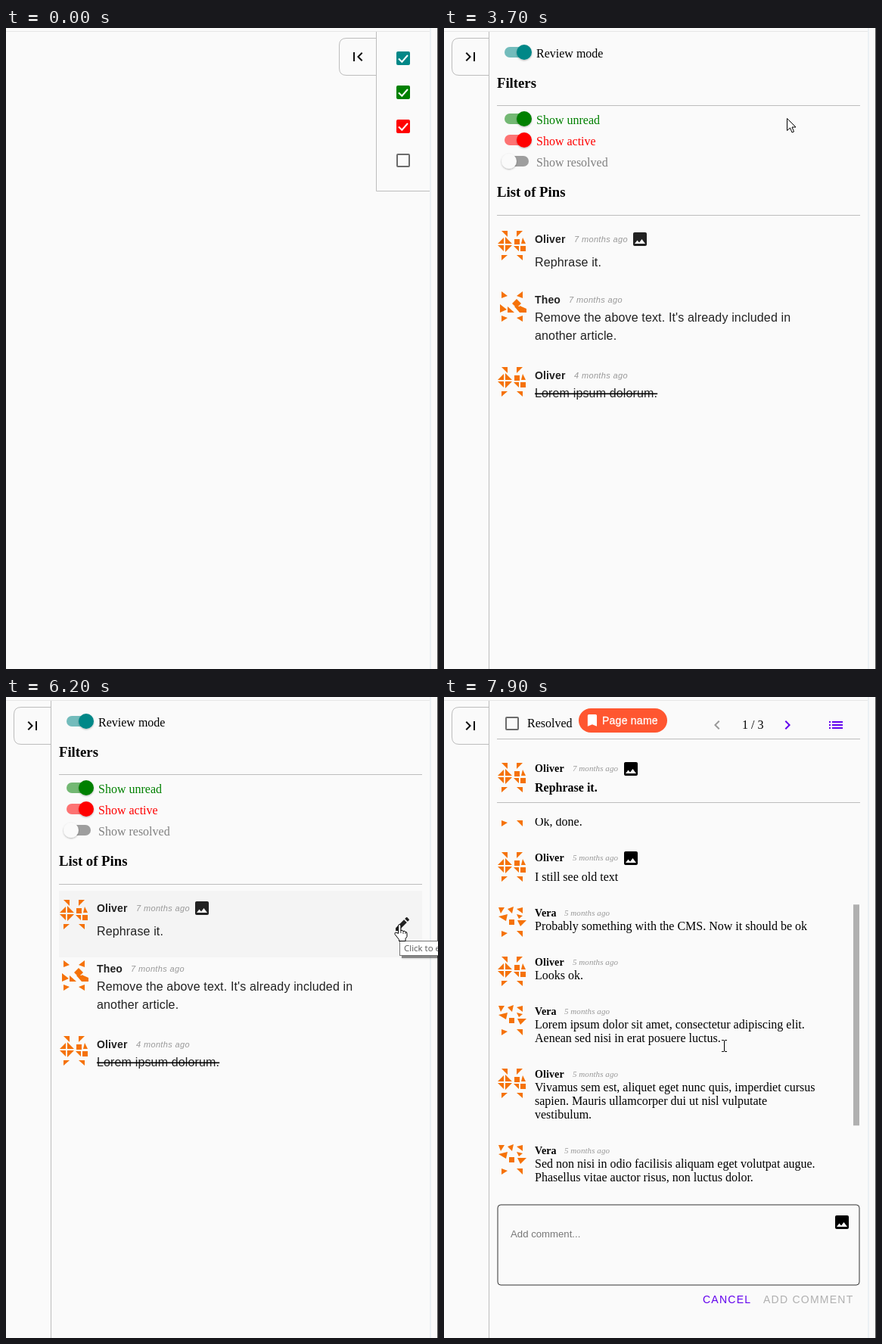
An HTML page for the animation above (8000 ms loop, 571x847 px).

```html
<!DOCTYPE html>
<html lang="en">
<head>
<meta charset="utf-8">
<title>Review panel</title>
<style>
  html, body { margin: 0; width: 100%; height: 100%; overflow: hidden; background: #fafafa; }
  svg { display: block; width: 100%; height: 100%; }
  text { font: 16px "Liberation Serif", serif; white-space: pre; }
  .heading { font-weight: bold; font-size: 18.72px; }
  .bold { font-weight: bold; }
  .name { font-weight: bold; font-size: 14px; letter-spacing: .1px; }
  .time { font-style: italic; font-size: 11px; letter-spacing: .06px; fill: #999; }
  .sans { font-family: "Liberation Sans", sans-serif; letter-spacing: .15px; fill: #222; }
  .sans.time { letter-spacing: .36px; fill: #999; }
  .button { font: 14px "Liberation Sans", sans-serif; letter-spacing: 1.25px; }
  .chip { font: 14px "Liberation Sans", sans-serif; letter-spacing: .25px; fill: #fff; stroke: #fff; stroke-width: .3; }
  .label { font: 13.2px "Liberation Sans", sans-serif; }
  .tip { font: 11.5px "Open Sans", sans-serif; fill: #575757; }
  .line { fill: none; stroke: #bdbdbd; }
  .loading .avatar { display: none; }
</style>
</head>
<body>
<svg id="stage" viewBox="0 0 571 847"></svg>
<script>
const PURPLE = '#6200ee';
const ICONS = {
  first: 'M18.41 16.59L13.82 12l4.59-4.59L17 6l-6 6 6 6zM6 6h2v12H6z',
  last: 'M5.59 7.41L10.18 12l-4.59 4.59L7 18l6-6-6-6zM16 6h2v12h-2z',
  prev: 'M15.41 7.41L14 6l-6 6 6 6 1.41-1.41L10.83 12z',
  next: 'M10 6L8.59 7.41 13.17 12l-4.58 4.59L10 18l6-6z',
  list: 'M3 13h2v-2H3v2zm0 4h2v-2H3v2zm0-8h2V7H3v2zm4 4h14v-2H7v2zm0 4h14v-2H7v2zM7 7v2h14V7H7z',
  image: 'M21 19V5c0-1.1-.9-2-2-2H5c-1.1 0-2 .9-2 2v14c0 1.1.9 2 2 2h14c1.1 0 2-.9 2-2zM8.5 13.5l2.5 3.01L14.5 12l4.5 6H5l3.5-4.5z',
  edit: 'M3 17.25V21h3.75L17.81 9.94l-3.75-3.75L3 17.25zM20.71 7.04c.39-.39.39-1.02 0-1.41l-2.34-2.34c-.39-.39-1.02-.39-1.41 0l-1.83 1.83 3.75 3.75 1.83-1.83z',
  bookmark: 'M17 3H7c-1.1 0-2 .9-2 2v16l7-3 7 3V5c0-1.1-.9-2-2-2z'
};
const AVATARS = {
  Oliver: 'M6 1h8v8zM26 1h8l-8 8zM1 18l8-8v8zM11 9l9 9h-9zM1 20h8v8zM11 20h9l-9 9zM23 12h7v7h-7zM31 21h7v7h-7zM22 21h7v7zM34 10l4 8h-6zM6 33h8l-8 7zM26 33h8v7z',
  Theo: 'M6 0v9l8-3zM34 0v9l-8-3zM26 10l6 6-6 6-6-6zM4 17l9 7-9 4zM14 20l9 8h-9zM23 20h7v8zM30 19l9 4v5h-9zM6 40v-8l8 3zM34 40v-8l-8 3z',
  Vera: 'M2 1h8l-5 8zM14 3l8-3-2 9zM26 3l8-2v8zM2 13l12-3-2 9zM16 17h7v7h-7zM27 18h12l-8 8zM6 40v-8l8 3zM26 32h8v8zM26 10l8 2-5 4z'
};
const COMMENTS = [
  ['Vera', '7 months ago', true, 'Could you describe it better?'],
  ['Oliver', '7 months ago', false, 'Remove last sentence and include more information in first', 'paragraph.'],
  ['Vera', '7 months ago', true, 'Ok, done.'],
  ['Oliver', '5 months ago', true, 'I still see old text'],
  ['Vera', '5 months ago', false, 'Probably something with the CMS. Now it should be ok'],
  ['Oliver', '5 months ago', false, 'Looks ok.'],
  ['Vera', '5 months ago', false, 'Lorem ipsum dolor sit amet, consectetur adipiscing elit.', 'Aenean sed nisi in erat posuere luctus.'],
  ['Oliver', '5 months ago', false, 'Vivamus sem est, aliquet eget nunc quis, imperdiet cursus', 'sapien. Mauris ullamcorper dui ut nisl vulputate', 'vestibulum.'],
  ['Vera', '5 months ago', false, 'Sed non nisi in odio facilisis aliquam eget volutpat augue.', 'Phasellus vitae auctor risus, non luctus dolor.'],
  ['Oliver', '5 months ago', false, 'Integer sed libero at odio mattis sodales. Ut dapibus erat', 'cursus porttitor malesuada.'],
  ['Vera', '6 minutes ago', true, 'qweqweqwe']
];

const text = (x, y, str, cls = '', fill = '') =>
  `<text x="${x}" y="${y}" class="${cls}" ${fill && `fill="${fill}"`}>${str}</text>`;
const rect = (x, y, w, h, attrs) => `<rect x="${x}" y="${y}" width="${w}" height="${h}" ${attrs}/>`;
const path = (d, x, y, fill, attrs = '') => `<path d="${d}" transform="translate(${x} ${y})" fill="${fill}" ${attrs}/>`;
const icon = (name, x, y, fill = '#111') => path(ICONS[name], x, y, fill);
const line = d => `<path class="line" d="${d}"/>`;
const rule = y => line(`M70 ${y}.5H550`);
const group = (id, content) => `<g id="${id}">${content}</g>`;
const avatar = (name, y) => path(AVATARS[name], 70, y, '#f57209', 'class="avatar"');
const emptyBox = (x, y) => rect(x + 1, y + 1, 16, 16, 'rx="1" fill="none" stroke="#6b6b6b" stroke-width="2"');
const tab = x => line(`M${x + 49} 13.5H${x + 10}q-9.5 0-9.5 9.5V53q0 9.5 9.5 9.5H${x + 49}`);

const checkBox = (y, fill) => rect(516, y, 18, 18, `rx="2" fill="${fill}"`) +
  path('M3 9.5L7.3 13.7L15 5', 516, y, 'none', 'stroke="#fff" stroke-width="2"');

const toggle = (y, fill, on, label, color) =>
  rect(80, y - 7, 32, 14, `rx="7" fill="${on ? fill : '#9e9e9e'}" opacity="${on ? .54 : 1}"`) +
  `<circle cx="${on ? 106 : 86}" cy="${y}" r="10" fill="${fill}" filter="url(#soft)"/>` +
  text(122, y + 7, label, '', color);

const pin = (y, avatarY, name, nameEnd, time) => avatar(name, avatarY) +
  text(120, y + 5, name, 'sans name') + text(nameEnd + 11, y + 4, time, 'sans time');

// y is the centre line of the author's name.
function comment([name, time, hasImage, ...lines], y, cls = '') {
  const timeX = name === 'Oliver' ? 170 : 159;
  const iconX = timeX + (time.startsWith('6') ? 68 : 65);
  const bodyY = y + (hasImage ? 31 : 23);
  return avatar(name, y - 8) + text(120, y + 5, name, 'name') + text(timeX, y + 4, time, 'time') +
    (hasImage ? icon('image', iconX, y - 11, '#000') : '') +
    lines.map((str, i) => text(120, bodyY + 18 * i, str, cls)).join('');
}

function thread() {
  let y = 178;
  return COMMENTS.map(c => {
    const html = comment(c, y);
    y += 47 + 18 * (c.length - 3) + (c[2] ? 8 : 0);
    return html;
  }).join('');
}

const tooltip = (id, x, y, w, str) => group(id,
  rect(x + 3, y + 3, w, 20, 'fill="#000" opacity=".45" filter="url(#soft)"') +
  rect(x + .5, y + .5, w - 1, 19, 'fill="#fff" stroke="#767676"') + text(x + 6, y + 14, str, 'tip'));

const collapsed = group('hover', '<circle cx="465" cy="38" r="23" fill="#f4f4f4"/>') +
  tab(440) + icon('first', 453, 26) + line('M489.5 5V215.5H560') +
  checkBox(31, '#008787') + checkBox(76, '#008000') + checkBox(121, '#f00') + emptyBox(516, 166);

const pins = toggle(32, '#008787', true, 'Review mode', '#000') +
  text(70, 79, 'Filters', 'heading') + rule(102) +
  toggle(120, '#008000', true, 'Show unread', '#008000') +
  toggle(148, '#f00', true, 'Show active', '#f00') +
  toggle(176, '#fafafa', false, 'Show resolved', '#808080') +
  text(70, 223, 'List of Pins', 'heading') + rule(247) +
  group('row', rect(70, 256, 480, 88, 'fill="#f4f4f4"') + icon('edit', 512, 288, '#222')) +
  pin(279, 267, 'Oliver', 161, '7 months ago') + icon('image', 247, 267, '#222') +
  text(120, 315, 'Rephrase it.', 'sans') +
  pin(359, 348, 'Theo', 154, '7 months ago') +
  text(120, 388, "Remove the above text. It's already included in", 'sans') +
  text(120, 412, 'another article.', 'sans') +
  pin(459, 447, 'Oliver', 161, '4 months ago') +
  `<g text-decoration="line-through">${text(120, 488, 'Lorem ipsum dolorum.', 'sans')}</g>`;

const detail = emptyBox(81, 26) + text(110, 40, 'Resolved') +
  rect(178, 15, 117, 32, 'rx="16" fill="#ff5630"') +
  `<g transform="translate(185.5 20.5) scale(.87)">${icon('bookmark', 0, 0, '#fff')}</g>` +
  text(209, 36, 'Page name', 'chip') +
  icon('prev', 349, 25, '#999') + text(394, 42, '1 / 3') +
  icon('next', 442, 25, PURPLE) + icon('list', 506, 25, PURPLE) + rule(55) +
  comment(['Oliver', '7 months ago', true, 'Rephrase it.'], 94, 'bold') + rule(139) +
  `<g clip-path="url(#viewport)">${group('thread', thread())}</g>` +
  rect(541, 160, 8, 292, 'id="thumb"') +
  rect(71, 671, 478, 106, 'id="field" rx="4" fill="none"') +
  text(88, 714, 'Add comment...', 'label').replace('<text', '<text id="label"') +
  rect(88, 711, 1, 16, 'id="caret" fill="#000"') + icon('image', 514, 682, '#000') +
  text(342, 801, 'CANCEL', 'button', PURPLE) + text(422, 801, 'ADD COMMENT', 'button', '#b0b0b0');

const outline = 'stroke="#000" stroke-linejoin="round"';
const cursors =
  group('arrow', path('M0 0V16L4 12.5L6.5 18.5L9 17.5L6.5 11.5H11.5Z', .5, .5, '#fff', outline)) +
  group('hand', path('M-1 12V2Q-1 0 .7 0T2.4 2V8Q5 7 5.5 9Q8 8 8.5 10Q10.5 9.5 10.5 12V16L8.5 19V22H0V20L-5.5 13Q-6 10.5-4 10.5Z', .5, .5, '#fff', outline) +
    '<path d="M2.9 8v4M6 9v4M9 10v3" stroke="#000" stroke-width=".8"/>') +
  group('beam', '<path d="M-3 -7.5H0M1 -7.5H4M.5 -7V7M-3 7.5H0M1 7.5H4" stroke="#000" fill="none"/>');

const stage = document.getElementById('stage');
stage.innerHTML = `<defs>
  <clipPath id="viewport">${rect(60, 160, 480, 500, '')}</clipPath>
  <filter id="soft" x="-30%" y="-30%" width="160%" height="160%"><feDropShadow dx="0" dy="1" stdDeviation="1.2" flood-opacity=".3"/></filter>
  </defs>` +
  rect(0, 0, 571, 847, 'fill="#fafafa"') + rect(0, 4, 560, 1, 'fill="#e6e6e6"') +
  rect(560, 0, 2, 847, 'fill="#ebf0f4"') + rect(570, 0, 1, 847, 'fill="#505050"') +
  group('collapsed', collapsed) +
  group('expanded', tab(10) + icon('last', 23, 26) + line('M59.5 5V847')) +
  group('pins', pins) + group('detail', detail) +
  tooltip('tipExpand', 469, 62, 124, 'Expand review panel') +
  tooltip('tipMode', 469, 57, 84, 'Review mode') +
  tooltip('tipEdit', 427, 322, 76, 'Click to edit') +
  tooltip('tipEditAgain', 520, 322, 76, 'Click to edit') +
  group('cursor', cursors);

const $ = id => document.getElementById(id);
const show = (id, visible) => { $(id).style.display = visible ? '' : 'none'; };
const set = (id, attrs) => Object.entries(attrs).forEach(([k, v]) => $(id).setAttribute(k, v));

const CURSOR_PATH = [
  [500, 562, 40], [800, 500, 34], [1100, 470, 38], [2200, 470, 38], [2400, 469, 37],
  [3200, 469, 37], [3700, 453, 119], [4100, 445, 209], [4900, 427, 299], [5000, 427, 299],
  [5300, 480, 300], [5700, 519, 300], [6700, 519, 300], [6900, 514, 303],
  [7100, 480, 271], [7300, 395, 410], [7600, 370, 461], [8000, 370, 461]
];
function cursorAt(t) {
  const i = Math.max(1, CURSOR_PATH.findIndex(k => k[0] >= t));
  const [t0, x0, y0] = CURSOR_PATH[i - 1], [t1, x1, y1] = CURSOR_PATH[i];
  const p = (t - t0) / (t1 - t0);
  return [x0 + (x1 - x0) * p, y0 + (y1 - y0) * p];
}

function render(t) {
  const during = (from, to) => t >= from && t < to;

  show('collapsed', t < 2300);
  show('hover', during(900, 2300));
  set('hover', { opacity: t < 2200 ? 1 : 2 });
  show('expanded', t >= 2300);
  show('pins', during(2300, 6400));
  show('row', during(4600, 6400));
  show('detail', t >= 6400);
  $('detail').classList.toggle('loading', t < 6500);

  show('tipExpand', during(1400, 2200));
  set('tipExpand', { opacity: t < 1500 ? .5 : 1 });
  show('tipMode', during(2900, 3300));
  show('tipEdit', during(5000, 5800));
  show('tipEditAgain', during(6100, 6400));

  const scroll = t < 6500 ? 0 : t < 7800 ? 355 : t < 7900 ? 275 : 195;
  set('thread', { transform: `translate(0 ${-scroll})` });
  set('thumb', { y: 160 + scroll * .586, fill: t < 6500 ? '#e6e6e6' : '#b0b0b0' });

  const focused = t < 7800, floating = during(6500, 7800);
  set('field', focused ? { stroke: PURPLE, 'stroke-width': 2 } : { stroke: '#333', 'stroke-width': 1 });
  set('label', floating ? { x: 87, y: 695, fill: '#a05cf5' } : { x: 88, y: 714, fill: '#777' });
  $('label').style.fontSize = floating ? '12.1px' : '';
  show('caret', during(6400, 6900) || during(7400, 7800));
  set('caret', t < 6500 ? { y: 725, height: 2 } : { y: 711, height: 16 });

  const [x, y] = cursorAt(t);
  const hand = during(900, 2400) || during(4600, 6400), beam = t >= 7600;
  show('cursor', t >= 500);
  show('hand', hand);
  show('beam', beam);
  show('arrow', !hand && !beam);
  set('cursor', { transform: `translate(${Math.round(x)} ${Math.round(y)})` });
}

function frame() {
  render(Math.floor(performance.now() % 8000 / 100) * 100);
  requestAnimationFrame(frame);
}
frame();
</script>
</body>
</html>
```
